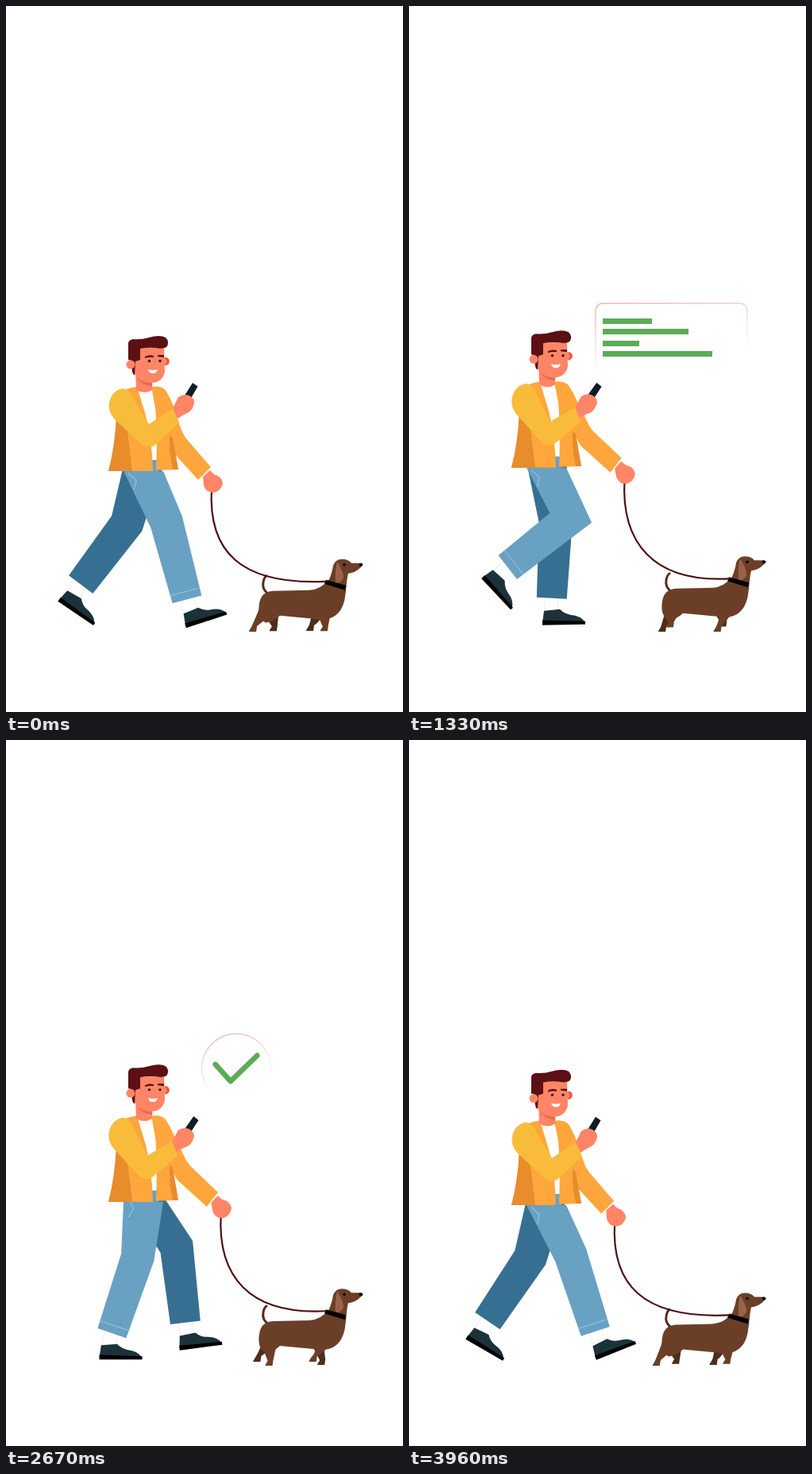
Recreate the animation shown at these times as an HTML page. Size 500 by 888 pixels, loop 4 s.

```html
<!DOCTYPE html>
<html lang="en">
<head>
<meta charset="utf-8">
<title>Dog walk</title>
<style>
html, body { margin: 0; width: 100%; height: 100%; overflow: hidden; background: #fff; }
svg { display: block; width: 100vw; height: 100vh; }
.skin { fill: #ff8566; }
.hair { fill: #5c1014; }
.coat { fill: #ffa63c; }
.coat-dark { fill: #e88c2c; }
.sleeve { fill: #f9bb3a; }
.fur { fill: #6b3f27; }
.fur-dark { fill: #4f2c1c; }
.near { fill: #69a1c3; }
.far { fill: #376f92; }
.seam { fill: none; stroke: #9cc6dd; stroke-width: 1; }
.shoe { fill: #1c323a; }
.line { fill: none; stroke-linecap: round; stroke-linejoin: round; }
.green { fill: #5cab57; }
</style>
</head>
<body>
<svg viewBox="0 0 500 888">
  <defs>
    <linearGradient id="edge" x1="0" y1="0" x2=".35" y2="1">
      <stop offset="0" stop-color="#eab5ae"/>
      <stop offset=".5" stop-color="#f1e4e2"/>
      <stop offset=".9" stop-color="#fff"/>
    </linearGradient>
    <g id="shoe">
      <path class="shoe" d="M-11 17L-9 2L11 0Q17 6 24 7Q38 8 43 17Z"/>
      <path d="M-11 14L43 15V19L-11 20Z"/>
    </g>
  </defs>

  <g id="farLeg">
    <path class="sock line" stroke="#f3eaea" stroke-width="18"/>
    <path class="sock line" stroke="#fff" stroke-width="16"/>
    <use href="#shoe"/>
    <path class="far cloth"/>
  </g>

  <g id="dog">
    <path id="rearFar" class="fur-dark"/>
    <path id="frontFar" class="fur-dark"/>
    <path id="rearNear" class="fur"/>
    <path id="frontNear" class="fur"/>
    <g id="dogBody">
      <path class="line" stroke="#5a2a1e" stroke-width="3" d="M331 740Q322 734 324 725Q325 719 328 717"/>
      <path class="fur" d="M319 752Q321 737 336 736L382 735Q397 734 406 722L428 730Q428 749 422 759Q414 772 398 772L345 767Q338 774 327 776Q316 770 319 752Z"/>
    </g>
    <g id="dogHead">
      <path class="fur" d="M405 726Q411 713 412 704Q415 696 423 696Q431 696 435 701L447 701Q450 704 446 707Q440 713 431 714Q429 722 428 738Z"/>
      <path d="M403 722L428 729L427 735L401 727Z"/>
      <path fill="#9a6249" d="M417 699Q414 712 415 725Q420 728 425 720Q426 713 417 699Z"/>
      <circle cx="426" cy="703" r="1.7"/>
      <ellipse cx="447" cy="703" rx="2.4" ry="2"/>
    </g>
  </g>

  <path id="leash" class="line" stroke="#4e1010" stroke-width="2.2"/>

  <g class="torso">
    <g id="leashArm">
      <path class="coat" d="M196 482Q204 486 208 498L222 536L226 543L258 580L242 596L212 563Q204 556 202 535Z"/>
      <path class="skin" d="M248 592L257 584L262 589Q272 592 273 601Q270 611 261 612Q252 612 249 603Z"/>
    </g>
  </g>

  <g id="nearLeg">
    <path class="sock line" stroke="#f3eaea" stroke-width="18"/>
    <path class="sock line" stroke="#fff" stroke-width="16"/>
    <use href="#shoe"/>
    <path class="near cloth"/>
    <path class="seam cuff"/>
    <path class="seam pocket" d="M-19 2L-9 12L-12 24"/>
  </g>

  <g class="torso">
    <path fill="#fff" d="M164 481H190L193 573H180Z"/>
    <path class="near" d="M182 571H192V585H182Z"/>
    <path class="coat" d="M165 479Q147 480 138 495L139 530Q136 560 129 585L185 585Q184 545 176 515Z"/>
    <path class="coat-dark" d="M139 515L151 520L159 585H129Q137 555 139 515Z"/>
    <path class="coat" d="M183 479Q197 477 202 485Q210 498 216 520L210 545L217 583L189 584Q191 535 188 505Z"/>
    <path class="coat-dark" d="M206 540L210 543L217 583L210 583Q205 560 206 540Z"/>
  </g>

  <g id="head">
    <path class="skin" d="M163 455H185L184 483Q175 489 164 483Z"/>
    <path fill="#e8694f" d="M164 466Q172 475 184 474L184 478Q170 477 164 466Z"/>
    <path class="skin" d="M160 430H199L200 460Q197 474 182 474Q167 473 162 463Z"/>
    <path class="hair" d="M154 427Q153 420 160 419Q170 420 180 417Q194 413 201 417Q206 422 203 428Q199 432 189 430Q177 429 169 431L169 445L163 447L162 464Q158 464 158 446L154 445Z"/>
    <circle class="skin" cx="157" cy="451" r="5.5"/>
    <circle class="skin" cx="201" cy="447" r="5"/>
    <path fill="#e8543f" d="M200 442Q207 443 205 449Q203 453 200 452Q205 448 200 442Z"/>
    <path class="hair" d="M175 441Q180 438 186 440V442Q180 441 175 443ZM191 439H199V442L191 441Z"/>
    <circle cx="180.500" cy="446.500" r="1.7" fill="#331012"/>
    <circle cx="194" cy="446.500" r="1.7" fill="#331012"/>
    <path fill="#fff" d="M179 457Q185 459 191 457Q190 462 185 462Q180 462 179 457Z"/>
  </g>

  <g class="torso">
    <g id="phoneArm">
      <path fill="#101c26" d="M235 474L241.500 478.500L232 495L225 490Z"/>
      <path class="skin" d="M209 508L217 492Q224 487 231 490Q238 494 237 500Q234 511 226 513L216 519Z"/>
      <path class="sleeve" d="M147 481Q157 483 162 496L180 526L210 506L218 524L188 552Q180 558 171 552L137 520Q128 510 130 499Q133 484 147 481Z"/>
    </g>
  </g>

  <g id="card">
    <rect x="0" y="-90" width="191" height="89" rx="9" fill="#fff" stroke="url(#edge)" stroke-width="1.500"/>
    <g id="bars" class="green"></g>
  </g>
  <g id="badge">
    <circle r="43" fill="#fff" stroke="url(#edge)" stroke-width="1.500"/>
    <path class="line" stroke="#5cab57" stroke-width="6.500" d="M-26-5L-7 16L26-16"/>
  </g>
</svg>
<script>
const $ = id => document.getElementById(id);
const set = (el, name, value) => el.setAttribute(name, value);
const move = (id, value) => set($(id), 'transform', value);
const rad = d => d * Math.PI / 180;
const clamp = x => Math.min(1, Math.max(0, x));
const wave = (t, period) => Math.cos(2 * Math.PI * t / period);
const STEP = 2000;

// time, thigh, shin and foot angles in degrees (forward / toe up positive)
const nearKeys = [
  [0, 24.5, 15, 17], [150, 17, 6, 2], [330, 8.5, -1.5, 1], [790, -9.6, -25, -5],
  [1040, -9, -39.5, -32], [1200, 8, -54, -46], [1330, 26, -52, -48],
  [1600, 37, -10, -12], [1780, 30, 25, 25], [1880, 27, 22, 27], [1960, 26, 18, 21]
];
const farKeys = [
  [0, -16, -37, -35], [190, 3, -60, -53], [330, 24, -62, -60], [580, 36, -15, -15],
  [790, 27, 27, 27], [1040, 20, 2.5, 3], [1330, 9, -3, 0],
  [1700, -7, -18, -4], [1880, -13, -29, -22], [1960, -15.5, -34, -31]
];

// periodic cubic through the keys
function pose(keys, t) {
  const n = keys.length;
  const at = i => {
    const k = keys[(i + n) % n];
    return [k[0] + Math.floor(i / n) * STEP, ...k.slice(1)];
  };
  let i = n - 1;
  while (keys[i][0] > t) i--;
  const [a, b, c, d] = [-1, 0, 1, 2].map(o => at(i + o));
  const h = c[0] - b[0], u = (t - b[0]) / h;
  return [1, 2, 3].map(j => {
    const m0 = (c[j] - a[j]) / (c[0] - a[0]) * h;
    const m1 = (d[j] - b[j]) / (d[0] - b[0]) * h;
    return (2 * u ** 3 - 3 * u * u + 1) * b[j] + (u ** 3 - 2 * u * u + u) * m0
      + (3 * u * u - 2 * u ** 3) * c[j] + (u ** 3 - u * u) * m1;
  });
}

const along = ([x, y], deg, len) => [x + len * Math.sin(rad(deg)), y + len * Math.cos(rad(deg))];
const across = ([x, y], deg, w) => [x + w * Math.cos(rad(deg)), y - w * Math.sin(rad(deg))];
const poly = pts => 'M' + pts.map(p => p.map(v => v.toFixed(2)).join(' ')).join('L');

function drawLeg(id, keys, t, hip, thighLen, shinLen) {
  const g = $(id), [thigh, shin, foot] = pose(keys, t);
  const knee = along(hip, thigh, thighLen);
  const cuff = along(knee, shin, shinLen);
  const ankle = along(cuff, shin, 14);
  const mid = (thigh + shin) / 2, w = 21 / Math.cos(rad((thigh - shin) / 2));
  const [hx, hy] = hip;
  set(g.querySelector('.cloth'), 'd', poly([
    [hx - 25, hy], across(knee, mid, -w), across(cuff, shin, -19),
    across(cuff, shin, 19), across(knee, mid, w), [hx + 25, hy]
  ]) + 'Z');
  g.querySelectorAll('.sock').forEach(s => set(s, 'd', poly([along(cuff, shin, -8), along(cuff, shin, 12)])));
  set(g.querySelector('use'), 'transform', `translate(${ankle}) rotate(${-foot})`);
  const seam = g.querySelector('.cuff');
  if (seam) {
    const s = along(cuff, shin, -10);
    set(seam, 'd', poly([across(s, shin, -19), across(s, shin, 19)]));
    set(g.querySelector('.pocket'), 'transform', `translate(${hip}) rotate(${(24 - thigh) * .6})`);
  }
}

function dogLeg(id, x, y, w, fx, fy) {
  const kx = (x + fx) / 2;
  set($(id), 'd', `M${x - w} ${y}Q${kx - w * .6} ${y + 13} ${fx - 2} ${fy - 6}L${fx - 5} ${fy - 1}V${fy}`
    + `H${fx + 4}L${fx + 5} ${fy - 7}Q${kx + w * .7} ${y + 12} ${x + w} ${y}Z`);
}

const backOut = x => 1 + 2.7 * (x - 1) ** 3 + 1.7 * (x - 1) ** 2;
const outQuad = x => 1 - (1 - x) ** 2;
const span = (t, start, len) => clamp((t - start) / len);

const barSizes = [[62, -71], [108, -58], [46, -43], [138, -30]];
const bars = barSizes.map(([, y]) => {
  const r = document.createElementNS('http://www.w3.org/2000/svg', 'rect');
  set(r, 'x', 9); set(r, 'y', y); set(r, 'height', 7);
  $('bars').append(r);
  return r;
});

function show(id, x, y, scale) {
  set($(id), 'visibility', scale > .004 ? 'visible' : 'hidden');
  move(id, `translate(${x} ${y}) scale(${Math.max(0, scale)})`);
}

function drawMan(t) {
  const bob = -4.5 * (1 - wave(t, 1000));
  const swing = (1 - wave(t - 20, STEP)) / 2;
  const low = .62 * bob, stretch = 1 - .33 * bob / 107;
  drawLeg('farLeg', farKeys, t, [173, 578 + low], 76, 96);
  drawLeg('nearLeg', nearKeys, t, [173, 585 + low], 70, 101);
  document.querySelectorAll('.torso').forEach(g =>
    set(g, 'transform', `translate(0 ${low + 585 * (1 - stretch)}) scale(1 ${stretch})`));
  move('head', `translate(0 ${bob})`);
  move('phoneArm', `rotate(${5 * swing} 147 497)`);
  const turn = -8.2 * swing;
  move('leashArm', `rotate(${turn} 200 490)`);
  const c = Math.cos(rad(turn)), s = Math.sin(rad(turn));
  const [dx, dy] = [59, 116];
  return [200 + dx * c - dy * s, 585 + low + (490 + dx * s + dy * c - 585) * stretch];
}

function drawDog(t, [hx, hy]) {
  const bob = -5 * (1 - wave(t - 60, 1000)) * .65;
  const stride = wave(t - 20, 1000);
  const lift = Math.sin(2 * Math.PI * (t - 20) / 1000) * 6;
  const up = Math.max(0, lift), down = Math.max(0, -lift);
  const body = .85 * bob;
  move('dogBody', `translate(0 ${body})`);
  move('dogHead', `translate(0 ${bob})`);
  dogLeg('rearNear', 331, 758 + body, 12, 324 - 13 * stride, 787 - up);
  dogLeg('rearFar', 334, 760 + body, 10, 324 + 13 * stride, 787 - down);
  dogLeg('frontNear', 401, 764 + body, 8, 392 + 9 * stride, 787 - down);
  dogLeg('frontFar', 393, 764 + body, 8, 392 - 9 * stride, 786 - up);
  set($('leash'), 'd', `M${hx} ${hy}C${hx - 5} ${hy + 80} ${hx + 36} ${729 + bob} 403 ${724 + bob}`);
}

function drawPopups(t) {
  show('card', 235, 464, outQuad(span(t, 600, 500)) - span(t, 1430, 490) ** 2);
  bars.forEach((r, i) => set(r, 'width', barSizes[i][0] * outQuad(span(t, 630 + 50 * i, 480))));
  const grow = t < 2500 ? span(t, 1850, 500) : 1 - span(t, 2627, 500);
  show('badge', 290, 413, backOut(grow));
}

function frame(now) {
  const t = now % 4000;
  drawDog(t, drawMan(t % STEP));
  drawPopups(t);
}

const start = performance.now();
function loop() {
  frame(performance.now() - start);
  requestAnimationFrame(loop);
}
loop();
</script>
</body>
</html>
```
